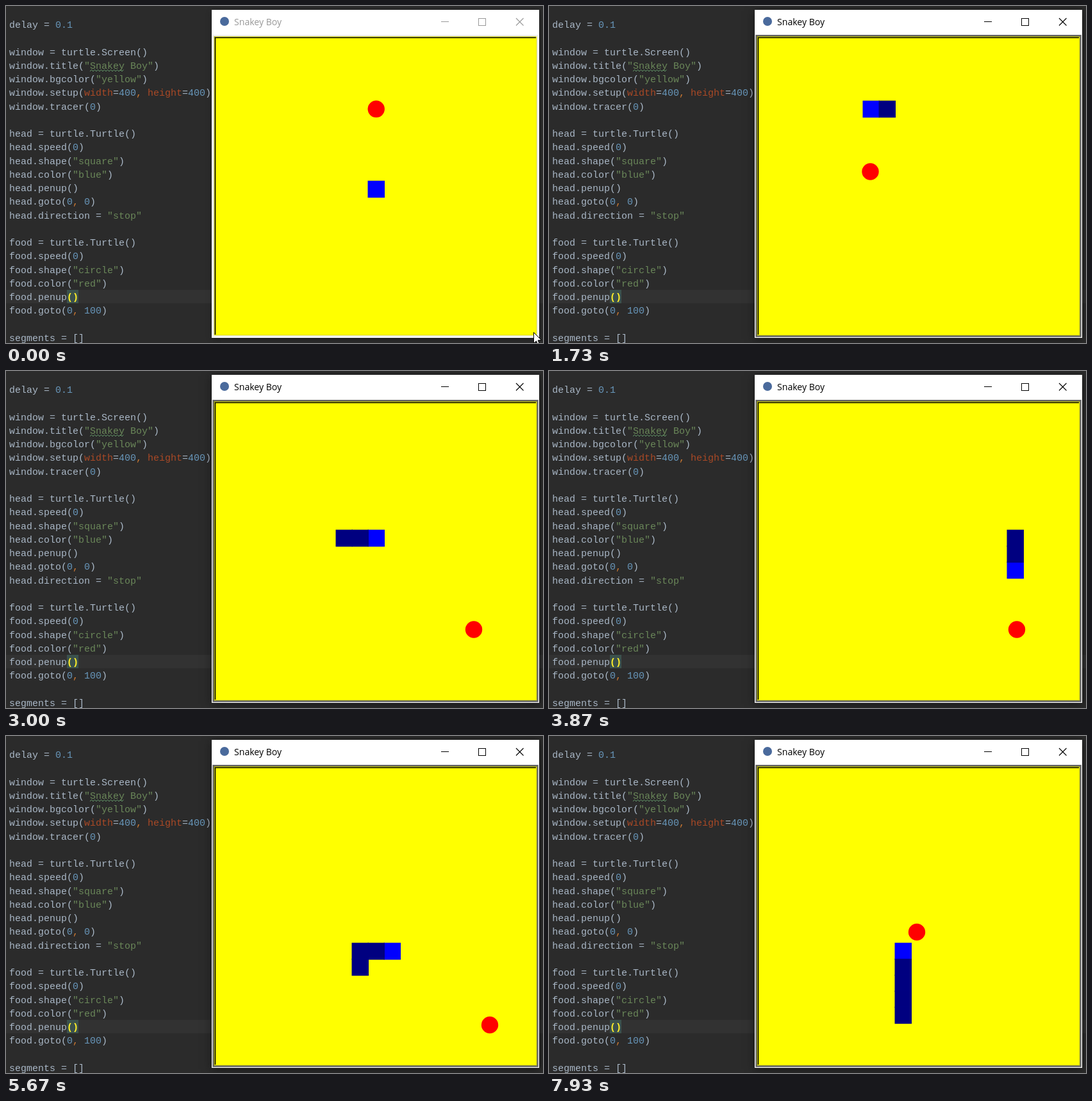
Animation of 838 by 526 pixels, one loop 8 s. Source, as an HTML page with a canvas:

```html
<!DOCTYPE html>
<html lang="en">
<head>
<meta charset="utf-8">
<title>Snake</title>
<style>
html, body { margin: 0; width: 100%; height: 100%; overflow: hidden; background: #2b2b2b; }
canvas { display: block; }
</style>
</head>
<body>
<canvas id="stage" width="838" height="526"></canvas>
<script>
const ctx = document.getElementById('stage').getContext('2d');
const LOOP = 8000;
const CELL = 25, SIZE = 26.5, ORIGIN = [564.5, 272.7];
const REACH = 24.8;
const ROUTE = 'U5 L6 D4 R12 D7 L7 U4 R8 D4 L8 U4';
const DIRS = { U: [0, -1], D: [0, 1], L: [-1, 0], R: [1, 0] };
const FOODS = [[577.7, 160.8], [501.5, 258.5], [730, 403.5], [755, 451], [574, 306]];

const CODE = `delay = 0.1

window = turtle.Screen()
window.title("Snakey Boy")
window.bgcolor("yellow")
window.setup(width=400, height=400)
window.tracer(0)

head = turtle.Turtle()
head.speed(0)
head.shape("square")
head.color("blue")
head.penup()
head.goto(0, 0)
head.direction = "stop"

food = turtle.Turtle()
food.speed(0)
food.shape("circle")
food.color("red")
food.penup()
food.goto(0, 100)

segments = []`.split('\n');
const CARET_LINE = 20;
const CHAR = 9, LEFT = 5, BASE = 34, LEADING = 21.25;

// Game ticks are slightly over 100 ms and land on a 15 fps grid.
function tickTime(n) {
  const frame = Math.floor(16 + 0.0245 * (n - 21) + 1.5 * n);
  return Math.round(frame * 100 / 15) * 10;
}

function near([cx, cy], [fx, fy]) {
  const x = ORIGIN[0] + SIZE / 2 + cx * CELL;
  const y = ORIGIN[1] + SIZE / 2 + cy * CELL;
  return Math.hypot(x - fx, y - fy) < REACH;
}

function play() {
  let body = [[0, 0]], food = 0;
  const states = [{ time: 0, body, food }];
  for (const run of ROUTE.split(' ')) {
    const [dx, dy] = DIRS[run[0]];
    for (let i = 0; i < +run.slice(1); i++) {
      const [hx, hy] = body[0];
      const ate = near(body[0], FOODS[food]);
      if (ate) food++;
      body = [[hx + dx, hy + dy], ...body.slice(0, ate ? body.length : -1)];
      states.push({ time: tickTime(states.length - 1), body, food });
    }
  }
  return states;
}
const states = play();

function rect(color, x, y, w, h) {
  ctx.fillStyle = color;
  ctx.fillRect(x, y, w, h);
}

function disc(color, x, y, r) {
  ctx.fillStyle = color;
  ctx.beginPath();
  ctx.arc(x, y, r, 0, 7);
  ctx.fill();
}

function line(color, width, ...pts) {
  ctx.strokeStyle = color;
  ctx.lineWidth = width;
  ctx.beginPath();
  pts.forEach(([x, y]) => ctx.lineTo(x, y));
  ctx.stroke();
}

function tokenColor(s) {
  if (s[0] === '"') return '#6a8759';
  if (/^\d/.test(s)) return '#6897bb';
  if (s === ',') return '#cc7832';
  if (/^(width|height)$/.test(s)) return '#aa4926';
  return '#a9b7c6';
}

function drawCode() {
  rect('#2b2b2b', 0, 0, 838, 526);
  rect('#323232', 0, 443, 838, 21);
  rect('#3b514d', LEFT + 10 * CHAR, 443, 2 * CHAR, 21);
  CODE.forEach((text, row) => {
    const y = BASE + row * LEADING;
    for (const m of text.matchAll(/"[^"]*"|[\d.]*\d|[a-zA-Z]+|\S/g)) {
      const brace = row === CARET_LINE && /[()]/.test(m[0]);
      ctx.font = (brace ? 'bold ' : '') + '15px "Liberation Mono", "Courier New", monospace';
      ctx.fillStyle = brace ? '#ffef28' : tokenColor(m[0]);
      ctx.fillText(m[0], LEFT + m.index * CHAR, y);
    }
  });
  const wave = [];
  for (let x = 131; x <= 185; x += 2.5) wave.push([x, wave.length % 2 ? 99.5 : 102]);
  line('#659c6b', 1, ...wave);
}

function drawWindow(active) {
  const ink = active ? '#000' : '#999';
  ctx.save();
  ctx.shadowColor = active ? 'rgba(0,0,0,.5)' : 'rgba(0,0,0,.35)';
  ctx.shadowBlur = active ? 14 : 8;
  ctx.shadowOffsetY = 2;
  rect('#fff', 321, 6, 511, 512);
  ctx.restore();

  disc('#4a6a9c', 341, 24, 7);
  ctx.font = '14.1px "Open Sans", "Noto Sans", sans-serif';
  ctx.fillStyle = ink;
  ctx.fillText('Snakey Boy', 356, 30);
  line(ink, 1, [679, 24.5], [691, 24.5]);
  ctx.strokeRect(737.5, 19.5, 11, 11);
  line(ink, 1.1, [796, 19], [807.5, 30.5]);
  line(ink, 1.1, [807.5, 19], [796, 30.5]);

  // focus ring, then the sunken edge of the playing field
  rect(active ? '#646464' : '#f0f0f0', 322.3, 45, 508.4, 471.8);
  rect('#e6e600', 324.8, 47.7, 503.5, 466.5);
  rect('#999900', 324.8, 47.7, 502.3, 1.25);
  rect('#999900', 324.8, 47.7, 1.25, 465.3);
  rect('#ff0', 326, 48.9, 501.1, 464.1);
  rect('#000', 326, 48.9, 501, 1.25);
  rect('#000', 326, 48.9, 1.25, 464);
}

function drawCell(color, [cx, cy]) {
  rect(color, ORIGIN[0] + cx * CELL, ORIGIN[1] + cy * CELL, SIZE, SIZE);
}

function drawGame(t) {
  const { body, food } = states.findLast(s => s.time <= t);
  drawCell('#00f', body[0]);
  disc('#f00', ...FOODS[food], 13.2);
  body.slice(1).forEach(c => drawCell('#000080', c));
}

function drawCursor(x, y) {
  const shape = [[0, 0], [0, 17], [4, 13.4], [6.6, 19.4], [9.2, 18.2], [6.6, 12.4], [12, 12]];
  ctx.beginPath();
  shape.forEach(([dx, dy]) => ctx.lineTo(x + dx, y + dy));
  ctx.closePath();
  ctx.fillStyle = '#fff';
  ctx.fill();
  ctx.strokeStyle = '#000';
  ctx.lineWidth = 1;
  ctx.stroke();
}

function draw(t) {
  drawCode();
  drawWindow(t >= 70);
  drawGame(t);
  if (t < 270) drawCursor(823.5, 509.5);
  else if (t < 330) drawCursor(829.5, 515.5);
}

const start = performance.now();
function tick() {
  draw((performance.now() - start) % LOOP);
  requestAnimationFrame(tick);
}
tick();
</script>
</body>
</html>
```
